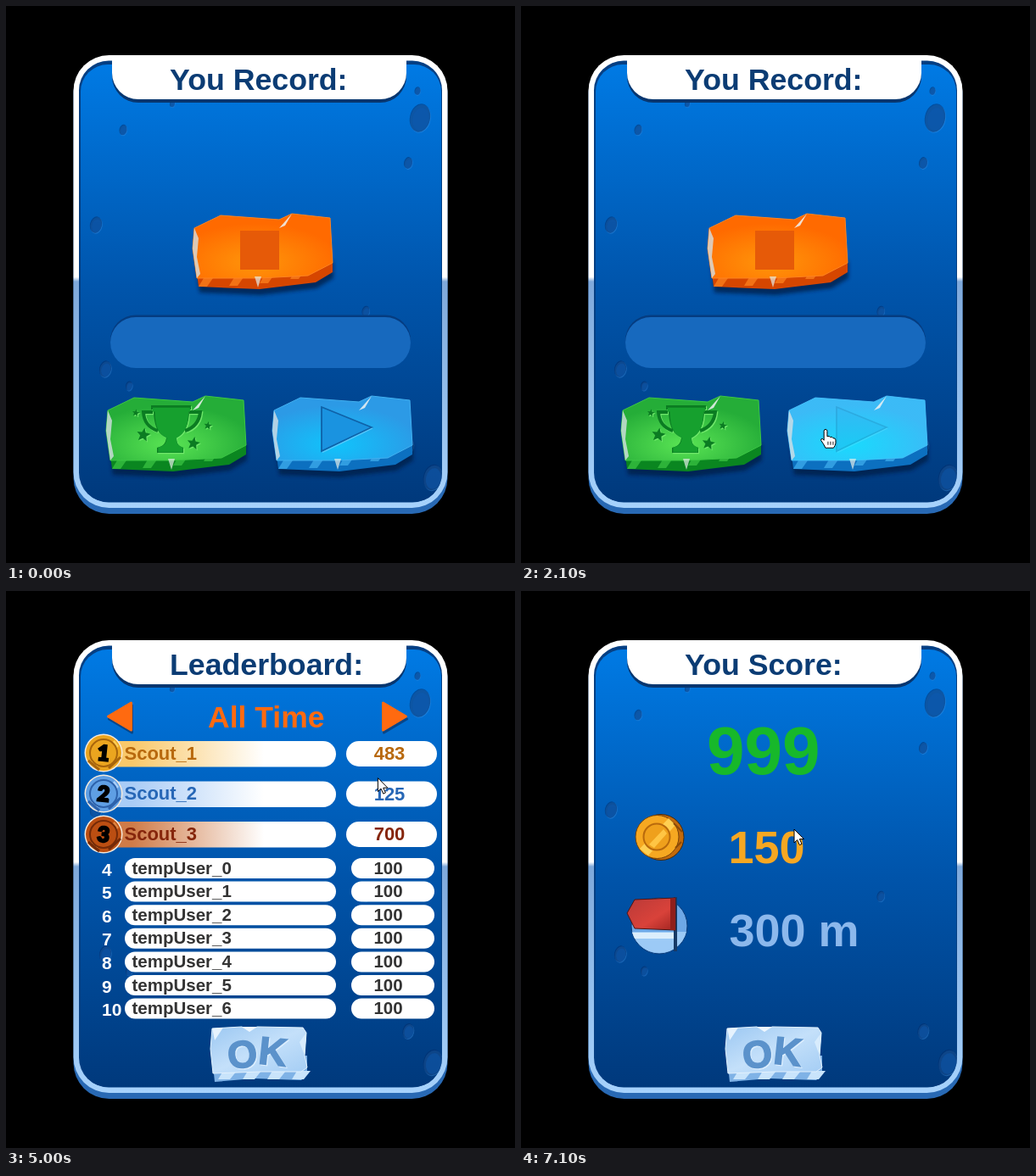
These frames come from a looping animation (600 by 657 pixels, 7200 ms). An HTML page:

```html
<!DOCTYPE html>
<html lang="en">
<head>
<meta charset="utf-8">
<title>Game menu</title>
<style>
  html, body { margin: 0; width: 100%; height: 100%; overflow: hidden; background: #000; }
  svg { display: block; width: 600px; height: 657px; }
  text { font-family: "Liberation Sans", Arial, sans-serif; font-weight: bold; }
  .chunky { font-family: Lato, "Open Sans", sans-serif; font-weight: 900; }
</style>
</head>
<body>
<svg id="stage" viewBox="0 0 600 657" xmlns="http://www.w3.org/2000/svg"></svg>
<script>
const LOOP = 7200, STEP = 100;
const defs = [];

function gradient(id, stops, dir = 'x1="0" y1="0" x2="0" y2="1"') {
  defs.push(`<linearGradient id="${id}" ${dir}>` +
    stops.map(([o, c]) => `<stop offset="${o}" stop-color="${c}"/>`).join('') + '</linearGradient>');
  return `url(#${id})`;
}
function radial(id, inner, outer) {
  defs.push(`<radialGradient id="${id}" cx=".45" cy=".75" r=".6"><stop offset="0" stop-color="${inner}"/>` +
    `<stop offset="1" stop-color="${outer}"/></radialGradient>`);
  return `url(#${id})`;
}
const poly = (pts, fill, more = '') => `<polygon points="${pts}" fill="${fill}" ${more}/>`;
const pill = (x, y, w, h, fill, r = h / 2) =>
  `<rect x="${x}" y="${y}" width="${w}" height="${h}" rx="${r}" fill="${fill}"/>`;
const label = (s, x, y, size, fill, more = '') =>
  `<text x="${x}" y="${y}" font-size="${size}" fill="${fill}" ${more}>${s}</text>`;
const ring = (x, y, r, fill, more = '') => `<circle cx="${x}" cy="${y}" r="${r}" fill="${fill}" ${more}/>`;
const shift = (dx, dy, inner, more = '') => `<g transform="translate(${dx} ${dy})" ${more}>${inner}</g>`;
const MID = 'text-anchor="middle"';

// Panel
function crater(x, y, r) {
  const oval = (d, k, fill, alpha) => `<ellipse cx="${x + d}" cy="${y + d}" rx="${r * k}" ry="${r * k * 1.4}" ` +
    `transform="rotate(12 ${x} ${y})" fill="${fill}" fill-opacity="${alpha}"/>`;
  return oval(.8, 1, '#4aa0f0', .35) + oval(0, 1, '#002a68', .5) + oval(1.2, .8, '#0a5ab4', .4);
}

function panel() {
  const rim = gradient('rim', [[0, '#fff'], [.49, '#fff'], [.5, '#7fa9db'], [1, '#a6d2fc']]);
  const sea = gradient('sea', [[0, '#007ae4'], [.5, '#0055ac'], [1, '#00397c']]);
  defs.push('<clipPath id="inside"><rect x="87" y="66" width="427" height="519" rx="33"/></clipPath>',
    '<filter id="soft" x="-20%" y="-20%" width="140%" height="150%"><feGaussianBlur stdDeviation="2"/></filter>');
  const craters = [[488, 132, 12], [485, 100, 3.5], [474, 185, 5], [138, 146, 4.5], [106, 258, 7],
    [424, 360, 4.5], [117, 428, 7], [145, 448, 4], [474, 519, 6.5], [503, 556, 11], [196, 115, 3]];
  const tab = (b, fill) => `<path d="M125 62V${b - 31}A31 31 0 0 0 156 ${b}H441A31 31 0 0 0 472 ${b - 31}V62Z" fill="${fill}"/>`;
  return pill(79.5, 60, 441, 539, '#2869b4', 42) + pill(79.5, 58, 441, 534, rim, 42) +
    pill(86, 64.5, 428, 521, '#053f83', 35) + pill(88, 69, 425, 516, sea, 32) +
    `<g clip-path="url(#inside)">${craters.map(c => crater(...c)).join('')}</g>` +
    tab(114, '#07366f') + tab(110, '#fff') + label('', 193, 99, 35.7, '#0b3c74', 'id="title"');
}

// Stone buttons
const FACE = '3,18 34,3 103,8 118,1 163,6 166,59 137,74 80,77 6,77 1,42';
const SIDE = '4,55 166,50 166,70 146,82 80,90 8,87';

function stone({ id, x, y, top, mid, side, streak, glow, halo }, icon) {
  let cuts = '';
  for (let i = 0; i < 4; i++) {
    const sx = 14 + 36 * i, sy = 77 - i * i;
    cuts += poly(`${sx},${sy} ${sx + 11},${sy} ${sx + 4},${sy + 10} ${sx - 6},${sy + 10}`, streak, 'opacity=".7"');
  }
  return shift(x, y,
    shift(1, 7, poly(SIDE, '#021b44', 'opacity=".75" filter="url(#soft)"')) + poly(SIDE, side) + cuts +
    `<g id="${id}">` +
    poly(FACE, radial(id + 'Fill', mid, top), `stroke="${streak}"`) + icon +
    poly(FACE, radial(id + 'Halo', glow, halo), `id="${id}Glow"`) +
    poly('3,18 8,30 6,52 10,72 6,77 1,42', '#d5dfe4', 'opacity=".8"') +
    poly('103,18 118,1 110,15', '#eef2f2', 'opacity=".85"') +
    poly('74,75 82,75 78,88', '#e4ece8', 'opacity=".7"') + '</g>');
}

function star(cx, cy, r) {
  return Array.from({ length: 10 }, (_, i) => {
    const a = i * Math.PI / 5 - 1.4, q = i % 2 ? r * .45 : r;
    return (cx + q * Math.cos(a)).toFixed(1) + ',' + (cy + q * Math.sin(a)).toFixed(1);
  }).join(' ');
}

function trophy() {
  const cup = 'M54 12H101V17H99C99 36 93 46 84 50C84 58 87 60 92 62V68H61V62C68 60 71 58 72 50C62 46 57 36 57 17H54Z';
  const arms = 'M56 20H45Q46 37 62 42M99 20H112Q110 37 94 42';
  const stars = [[36, 21, 4.5], [121, 36, 5], [45, 47, 8.5], [104, 57, 8]];
  const copy = (d, color) => shift(d, d, `<path d="${arms}" fill="none" stroke="${color}" stroke-width="4"/>` +
    `<path d="${cup}"/>` + stars.map(s => poly(star(...s), color)).join(''), `fill="${color}"`);
  return copy(1.2, '#6fe86a') + copy(0, '#0b7c22') +
    `<path d="${cup}" fill="#16a02e" transform="translate(5 3.5) scale(.94)"/>`;
}

function okButton(id) {
  const ice = gradient(id + 'Ice', [[0, '#9cc8f2'], [.5, '#c4e0fa'], [1, '#a4cdf4']], 'x1="0" y1="0" x2="1" y2="1"');
  const word = (d, fill) => shift(d, d,
    label('O', 261, 562, 45, fill, 'transform="rotate(-5 278 546)"') +
    label('K', 298, 559, 46, fill, 'transform="rotate(6 315 543)"'),
    `class="chunky" stroke="${fill}" stroke-width="1.6"`);
  let cuts = '';
  for (let x = 256; x < 345; x += 29) cuts += poly(`${x},566 ${x + 16},566 ${x + 8},576 ${x - 6},576`, '#c9e4fb');
  return poly('243,550 355,548 355,570 348,577 292,575 246,579', '#7fb2e6') + cuts + `<g id="${id}">` +
    poly('243,516 278,514 287,519 296,514 350,515 354,521 352,548 355,562 348,567 300,567 244,569 241,540', ice,
      'stroke="#e3f1fd"') +
    poly('243,516 256,515 246,530', '#e6f3fe') + poly('278,514 296,514 287,520', '#eef7ff') +
    poly('354,521 346,532 352,548', '#d8ecfd') + word(1.3, '#dceefe') + word(0, '#5b92cb') + '</g>';
}

// Screens
const stones = [
  { id: 'orange', x: 219, y: 244, top: '#ff6a00', mid: '#ff960a', side: '#d64600', streak: '#ff8420', glow: '#ffd02a', halo: '#ff9c20' },
  { id: 'green', x: 117, y: 459, top: '#25ad38', mid: '#5ae454', side: '#0a8620', streak: '#3cc644', glow: '#62e45c', halo: '#38be48' },
  { id: 'blue', x: 313, y: 459, top: '#2c9ae6', mid: '#10c4fc', side: '#0c70c0', streak: '#42b0f0', glow: '#1ee6ff', halo: '#44ccff' }
];

function recordScreen() {
  const icons = [
    pill(57, 21, 46, 46, '#e65a08', 0),
    poly('59,14 59,66 118,38', '#1a93e0', 'stroke="#0f62a8" stroke-width="1.8"') +
      '<path d="M60 67.5L119 39" stroke="#5cc8fa" stroke-width="1.3"/>'
  ];
  return pill(123, 364.5, 354, 61, '#053c80', 30) + pill(123, 367, 354, 60, '#1769be', 30) +
    stone(stones[0], icons[0]) + stone(stones[1], trophy()) + stone(stones[2], icons[1]);
}

function medal(n, y, light, base, dark) {
  return ring(115, y, 22.5, '#f4e9dc') + ring(115, y, 21, base) +
    `<path d="M98 ${y + 12}L128 ${y - 15}L133 ${y - 8}L106 ${y + 18}Z" fill="${light}"/>` +
    ring(115, y, 16, base, `stroke="${dark}" stroke-width="2"`) +
    `<path d="M97 ${y + 9}L110 ${y + 20}M121 ${y + 18}L135 ${y + 5}" stroke="${dark}" stroke-width="3"/>` +
    label(n, 115, y + 9, 25, '#000', `class="chunky" ${MID} stroke="#000" stroke-width="2" transform="rotate(6 115 ${y})"`);
}

function boardScreen() {
  const arrow = (side, fill) => {
    const tip = 296 + side * 175.5, base = 296 + side * 148.5;
    return poly(`${tip},148 ${base},132 ${base},164`, fill, `stroke="${fill}" stroke-width="3" stroke-linejoin="round"`);
  };
  const top = [
    ['#f9c86a', '#b8690e', 483, '#ffcf55', '#eba51f', '#a8650c'],
    ['#a9ccf6', '#2767b6', 125, '#a9d0fa', '#5f9fe4', '#2d62ab'],
    ['#cf7b48', '#86260c', 700, '#e08440', '#bb4e12', '#742a08']
  ];
  let out = shift(1, 3, arrow(-1, '#0a2d5c') + arrow(1, '#0a2d5c'), 'opacity=".6"') + arrow(-1, '#ff6a10') +
    `<g id="next">${arrow(1, '#ff6a10')}</g>` + label('All Time', 238, 161, 35.5, '#ff6a10');
  top.forEach(([tint, ink, score, light, base, dark], i) => {
    const y = 177 + 47.5 * i;
    const fade = gradient('row' + i, [[0, tint], [.15, tint], [.7, '#fff'], [1, '#fff']], 'x1="0" x2="1"');
    out += pill(106, y, 283, 30.5, fade) + pill(401, y, 107, 30, '#fff') +
      medal(i + 1, 191 + 48 * i, light, base, dark) +
      label('Scout_' + (i + 1), 139.5, y + 21.5, 22, ink) + label(score, 452, y + 22, 22, ink, MID);
  });
  for (let i = 0; i < 7; i++) {
    const y = 315 + 27.6 * i;
    out += label(i + 4, 113, y + 20.5, 21, '#fff') + pill(140, y, 249, 24, '#fff') + pill(407, y, 98, 24, '#fff') +
      label('tempUser_' + i, 148.5, y + 18.5, 20.5, '#333') + label(100, 450.5, y + 18.5, 20.5, '#333', MID);
  }
  return out + okButton('okBoard');
}

function scoreScreen() {
  const coin = ring(165, 290.5, 27, '#c26a0c', 'stroke="#4a2a08"') + ring(160.5, 290, 25.5, '#f6a821', 'stroke="#7a4408"') +
    '<path d="M140 304L174 268L182 276L150 312Z" fill="#ffcf52"/>' +
    ring(160, 290, 15.5, '#efa01c', 'stroke="#b8690c" stroke-width="2"') +
    '<path d="M151 299L168 281L172 286L157 303Z" fill="#ffc544"/>' +
    '<path d="M180 274L190 284M182 303L189 296" stroke="#8a4a08" stroke-width="2"/>';
  const cloth = gradient('cloth', [[0, '#b93a38'], [.6, '#d9423a'], [1, '#a02420']], 'x1="0" y1="0" x2="1" y2="1"');
  const flag = ring(163, 395, 33, '#6ea8e6', 'stroke="#0c3c78"') +
    '<path d="M131 402H195A33 33 0 0 1 131 402Z" fill="#9ccaf6"/><path d="M131 403H182V410H134Z" fill="#dceefc"/>' +
    '<path d="M182 361V425" stroke="#173a66" stroke-width="4"/>' +
    poly('125,380 134,364 182,362 182,400 134,398', cloth, 'stroke="#4e1414"') +
    poly('176,363 182,362 182,400 176,400', '#8f1f1c');
  return label('999', 219, 215.5, 80, '#17b82a') + coin + label('150', 244.5, 321, 54, '#f6a722') +
    flag + label('300 m', 245.5, 419, 54, '#8cb8ec') + okButton('okScore');
}

const cursor = `<g id="cursor"><g id="hand" transform="translate(1 0)" stroke="#000">
  <path d="M-1.8 1.5Q-1.5 -.6 .3 -.4Q2 -.2 2 1.8V8Q4.5 6.8 5.6 8.8Q8 7.8 9 10Q11.6 9.6 12 12V16Q11.5 19 9.5 21.5H0Q-2 17-5.3 12.6Q-5.6 10.4-3.4 10.8L-1.8 12.5Z" fill="#fff"/>
  <path d="M3 14V18M6 14V18M9 14V18" stroke-width=".9"/></g>
  <path id="tip" d="M0 0V16L3.7 12.6L6.4 18.6L9 17.4L6.4 11.6H11.5Z" fill="#fff" stroke="#000"/></g>`;

const stage = document.getElementById('stage');
const body = panel() + `<g id="record">${recordScreen()}</g><g id="board">${boardScreen()}</g>` +
  `<g id="score">${scoreScreen()}</g>` + ring(0, 0, 7, 'none', 'id="click" stroke="#d81e14" stroke-width="3.6"') + cursor;
stage.innerHTML = `<defs>${defs.join('')}</defs>` + body;

const el = id => document.getElementById(id);
const show = (id, on) => el(id).setAttribute('display', on ? 'inline' : 'none');
const move = (id, x, y) => el(id).setAttribute('transform', `translate(${x} ${y})`);

// Cursor stops: time, x, y
const stops = [
  [600, 440, 600], [1000, 320, 300], [1300, 345, 315], [1400, 380, 350], [1800, 395, 500], [2700, 252, 499],
  [3000, 252, 499], [3900, 457, 149], [4700, 457, 149], [5800, 355, 541], [6000, 365, 470], [6100, 318, 325], [6500, 322, 281]
];
const presses = { green: 2900, next: 4000, okBoard: 5800, orange: 6400 };
const titles = { record: 'You Record:', board: 'Leaderboard:', score: 'You Score:' };

const viewAt = t => t >= 6500 ? 'score' : t >= 3000 && t < 5900 ? 'board' : 'record';

function cursorAt(t) {
  const i = stops.findIndex(s => s[0] > t);
  if (i < 1) return stops.at(i).slice(1);
  const [t0, x0, y0] = stops[i - 1], [t1, x1, y1] = stops[i];
  const u = (t - t0) / (t1 - t0), e = u * u * (3 - 2 * u);
  return [x0 + (x1 - x0) * e, y0 + (y1 - y0) * e];
}

function within(t, x, y, w, h) {
  const [cx, cy] = cursorAt(t);
  return cx > x && cx < x + w && cy > y && cy < y + h;
}
const overStone = (s, t) => viewAt(t) === 'record' && within(t, s.x - 2, s.y - 2, 170, 110);

// Light up one step after the cursor arrives, then fade out
function glowAt(s, t) {
  for (let k = 1; k < 5; k++) if (overStone(s, t - k * STEP)) return 1 - (k - 1) / 4;
  return 0;
}

function draw(ms) {
  const t = Math.floor(ms % LOOP / STEP) * STEP, view = viewAt(t);
  for (const id in titles) show(id, id === view);
  el('title').textContent = titles[view];
  for (const s of stones) el(s.id + 'Glow').setAttribute('opacity', glowAt(s, t) * .65);
  for (const id in presses) move(id, 0, t !== presses[id] ? 0 : id === 'next' ? 2 : 6);

  const hand = view === 'record' ? stones.some(s => overStone(s, t))
    : view === 'board' && (within(t, 440, 128, 36, 40) || within(t, 240, 512, 118, 68));
  show('cursor', t >= stops[0][0]);
  show('hand', hand);
  show('tip', !hand);
  show('click', Object.values(presses).includes(t));
  move('cursor', ...cursorAt(t));
  move('click', ...cursorAt(t));
}

const start = performance.now();
function tick() {
  draw(performance.now() - start);
  requestAnimationFrame(tick);
}
tick();
</script>
</body>
</html>
```
